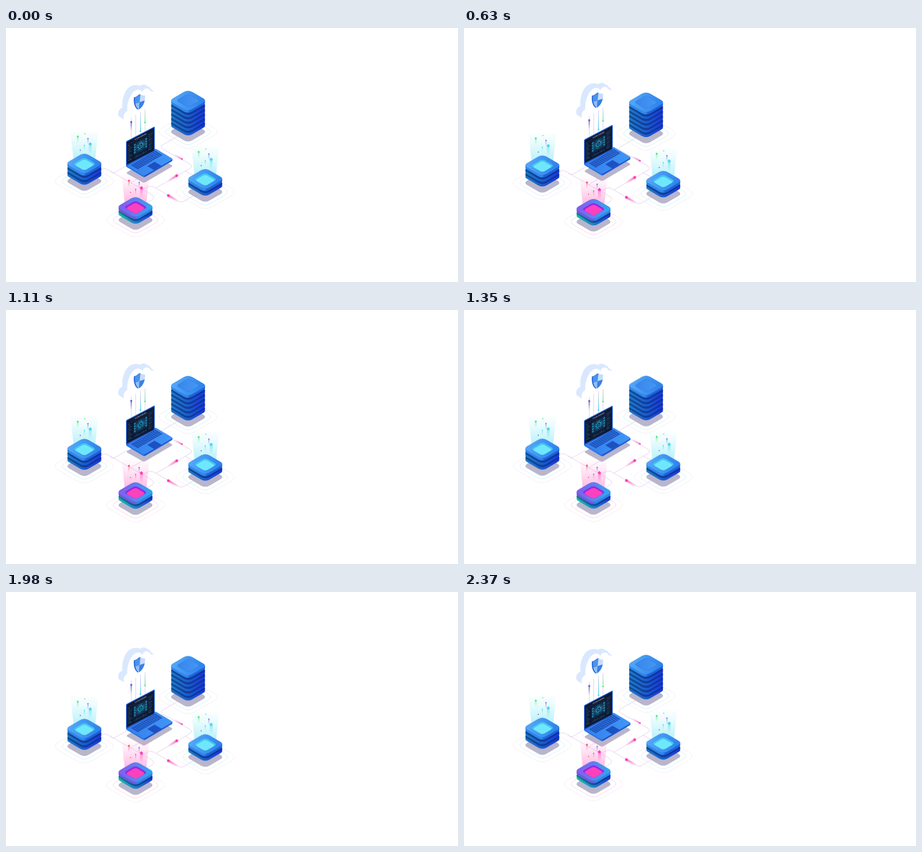
Animation of 998x561 px, one loop 2400 ms. Source, as an HTML page:

```html
<!DOCTYPE html>
<html lang="en">
<head>
<meta charset="utf-8">
<title>Isometric network</title>
<style>
html, body { margin: 0; width: 100%; height: 100%; overflow: hidden; background: #fff; }
svg { display: block; width: 998px; height: 561px; }
</style>
</head>
<body>
<svg id="stage" viewBox="0 0 998 561" xmlns="http://www.w3.org/2000/svg">
  <defs id="defs"></defs>
  <g id="ground"></g>
  <g id="device"></g>
  <g id="racks"></g>
</svg>
<script>
const NS = 'http://www.w3.org/2000/svg';
const byId = id => document.getElementById(id);
const defs = byId('defs'), ground = byId('ground'), device = byId('device'), racks = byId('racks');

function add(parent, tag, attrs) {
  const el = document.createElementNS(NS, tag);
  for (const k in attrs) el.setAttribute(k, attrs[k]);
  return parent.appendChild(el);
}
const shape = (g, d, fill, more) => add(g, 'path', { d, fill, ...more });
const stroke = (g, d, color, width = 0.7, more) =>
  add(g, 'path', { d, fill: 'none', stroke: color, 'stroke-width': width, ...more });

// Gradient in stage coordinates; each stop is [offset, colour, opacity]
let gradCount = 0;
function grad(x1, y1, x2, y2, stops) {
  const id = 'g' + gradCount++;
  const lg = add(defs, 'linearGradient', { id, x1, y1, x2, y2, gradientUnits: 'userSpaceOnUse' });
  for (const [offset, color, alpha = 1] of stops)
    add(lg, 'stop', { offset, 'stop-color': color, 'stop-opacity': alpha });
  return `url(#${id})`;
}

// Fading streak from a head point to a far end
function tail(g, x1, y1, x2, y2, w, color, alpha = 0.55) {
  const len = Math.hypot(x2 - x1, y2 - y1);
  const nx = -(y2 - y1) / len * w / 2, ny = (x2 - x1) / len * w / 2;
  shape(g, `M${x1 + nx} ${y1 + ny}L${x2 + nx} ${y2 + ny}L${x2 - nx} ${y2 - ny}L${x1 - nx} ${y1 - ny}Z`,
    grad(x1, y1, x2, y2, [[0, color, alpha], [1, color, 0]]));
}
const gem = (g, x, y, r, color) => shape(g, `M${x} ${y - r}l${r} ${r}l${-r} ${r}l${-r} ${-r}z`, color);

// Isometric rounded square
const CUT = 0.22, RATIO = 0.577;
function diamond(x, y, a) {
  const b = a * RATIO, c = CUT, d = 1 - CUT;
  return `M${x - a * d} ${y - b * c}L${x - a * c} ${y - b * d}Q${x} ${y - b} ${x + a * c} ${y - b * d}` +
    `L${x + a * d} ${y - b * c}Q${x + a} ${y} ${x + a * d} ${y + b * c}` +
    `L${x + a * c} ${y + b * d}Q${x} ${y + b} ${x - a * c} ${y + b * d}` +
    `L${x - a * d} ${y + b * c}Q${x - a} ${y} ${x - a * d} ${y - b * c}Z`;
}
// Front wall below the same rounded square
function wall(x, y, a, h) {
  const b = a * RATIO, c = CUT, d = 1 - CUT, e = a * (1 - CUT / 2), z = y + h;
  return `M${x - e} ${y}V${z}Q${x - e} ${z + b * c / 2} ${x - a * d} ${z + b * c}` +
    `L${x - a * c} ${z + b * d}Q${x} ${z + b} ${x + a * c} ${z + b * d}` +
    `L${x + a * d} ${z + b * c}Q${x + e} ${z + b * c / 2} ${x + e} ${z}V${y}Z`;
}

const SIZE = 42, THICK = 5.5, STEP = 10, SHADOW = '#b9b5cb';

// Colours run from the left corner to the right one
const BLUE = {
  face: ['#52a5f7', '#2f84ec'], top: ['#2f86ea', '#1c62d8'],
  side: ['#1f78cc', '#1a5fca', '#1539dc'], shade: ['#104a8e', '#1230a6']
};
const PINK = {
  face: ['#8260ee', '#35a3f0'], top: ['#6f58e2', '#2b86e6'],
  side: ['#16bcb0', '#1f84c6', '#1539dc'], shade: ['#0f7f86', '#1230a6']
};

function rack(x, y, plates, skin, ring, beam) {
  const topY = y - 19 - STEP * (plates - 1);
  stroke(ground, diamond(x, y, 72), '#ecdff3', 0.7);
  stroke(ground, diamond(x, y, 55.5), ring, 0.9);
  shape(racks, diamond(x, y, SIZE), SHADOW);
  if (beam) shape(racks, `M${x - 31} ${topY - 74}H${x + 31}L${x + 23} ${topY}H${x - 23}Z`,
    grad(0, topY - 74, 0, topY, [[0, beam, 0], [0.35, beam, 0.2], [1, beam, 0.7]]));
  for (let i = 0; i < plates; i++) {
    const py = y - 19 - STEP * i, last = i === plates - 1;
    const [l, r] = skin.top, [s0, s1, s2] = skin.side;
    const side = last ? [[0, l], [0.48, l], [0.56, r], [1, r]] : [[0, s0], [0.48, s1], [1, s2]];
    shape(racks, wall(x, py, SIZE, THICK), grad(x - 37, 0, x + 37, 0, side));
    const [f0, f1] = last ? skin.face : skin.shade;
    shape(racks, diamond(x, py, SIZE), grad(x - 30, py - 6, x + 30, py + 8, [[0, f0], [1, f1]]));
  }
  return topY;
}

function pad(x, y, rim, core) {
  shape(racks, diamond(x, y + 1, 26), rim);
  shape(racks, diamond(x, y + 3, 22), core);
}

// Sparks: dx, dy, radius, tail length, colour
const GREEN = '#4be77c', VIOLET = '#5b55d6', CYAN = '#4fd5ee', ROSE = '#ff3db4', RED = '#f4536f';
const coolSparks = [
  [-14.5, -59.5, 2.5, 14, GREEN], [1, -65.5, 1.5, 0, GREEN], [8, -55, 1.6, 13, VIOLET],
  [13, -43, 4, 22, CYAN], [0, -40, 1.5, 12, CYAN], [-9, -29, 1.4, 0, VIOLET]
];
const warmSparks = [
  [-14.5, -58, 2.5, 14, RED], [8, -54, 1.6, 12, VIOLET], [13, -42, 4, 22, ROSE],
  [0.3, -39, 1.6, 12, ROSE], [-11, -32, 1.5, 0, RED]
];
function sparks(x, y, list) {
  for (const [dx, dy, r, len, color] of list) {
    if (len) tail(racks, x + dx, y + dy, x + dx, y + dy + len, r * 1.6, color, 0.5);
    gem(racks, x + dx, y + dy, r, color);
  }
}

// Wiring
[
  'M208 315L213 312Q218 309 225 313L320 367Q331 374 322 380L306 389',
  'M230 316Q236 322 242 318L268 303',
  'M302 326L281 338Q276 341 277.500 344',
  'M395 230L346 258Q339 262 346 267L405 300Q414 305 407 309.500L332 353',
  'M396 316L416 327',
  'M300 357L315 350Q321 347.500 328 352L380 382Q387 386 394 382L440 355'
].forEach(d => stroke(ground, d, '#d3b4e6', 0.75));

// Travelling packets: head, tail end, size
[
  [388.5, 289.3, 371, 279, 3.2],
  [377, 326, 357, 338.5, 5.4],
  [358.5, 370, 381, 383, 5.4]
].forEach(([x, y, tx, ty, s]) => {
  tail(ground, x, y, tx, ty, s, ROSE, 0.65);
  add(ground, 'rect', { x: x - s / 2, y: y - s / 2, width: s, height: s, fill: ROSE, transform: `rotate(18 ${x} ${y})` });
});

// Racks
const TEAL = '#c4eef3';
const towerY = rack(402, 229, 6, BLUE, TEAL);
const inset = diamond(402, towerY, 26);
shape(racks, inset, grad(380, 0, 424, 0, [[0, '#3787ec'], [1, '#4596f3']]));
stroke(racks, inset, '#3277dc', 0.6);

[[173, 338, 3], [440, 362, 2]].forEach(([x, y, n]) => {
  const top = rack(x, y, n, BLUE, TEAL, '#8beaf6');
  pad(x, top, '#43c3ef', '#6ee7fb');
  sparks(x, top, coolSparks);
});
const pinkY = rack(286, 424, 2, PINK, '#fbc3e4', '#ff8ed2');
pad(286, pinkY, '#9a25e2', '#fb41bd');
sparks(286, pinkY, warmSparks);

// Cloud and shield
shape(device, 'M260 202L249 195C245 186 251 178 257 176C255 160 262 135 275 129C283 125 291 125 295 128' +
  'C302 124 308 124 313 129C316 129.500 318 131 319 134L327 140.500L330 160L300 200Z', '#d9e8fe');
shape(device, 'M261 204C257 192 263 186 268 183C266 167 274 146 284 139C291 134 298 136 301 142' +
  'C304 132 314 131 319 139C322 141.500 325 140 328 141L334 165L310 204Z', '#fff');

const shield = 'M285 153C290 152 294 149 297 146C300 149 304 150 307 149C308 162 303 174 293.500 180C287 176 283.500 166 285 153Z';
shape(device, shield, '#2467d6', { transform: 'translate(-2.500 .4)' });
add(add(defs, 'clipPath', { id: 'shield' }), 'path', { d: shield });
const quarters = add(device, 'g', { 'clip-path': 'url(#shield)' });
shape(quarters, 'M280 145H297L295 164L280 169Z', '#4a93ee');
shape(quarters, 'M297 145H310V159L295 164Z', '#c6dcfc');
shape(quarters, 'M280 169L295 164L293.500 182H280Z', '#8fbdf8');
shape(quarters, 'M295 164L310 159V182H293.500Z', '#3a80e4');

// Uplink lines
[[276.5, 198, 244], [286.5, 192, 240], [297, 185, 236], [307, 180, 230]]
  .forEach(([x, y1, y2]) => stroke(device, `M${x} ${y1}V${y2}`, '#d3b4e6', 0.8));
tail(device, 276.5, 207.5, 276.5, 228, 3.4, VIOLET, 0.7);
gem(device, 276.5, 207.5, 2.6, VIOLET);
tail(device, 297, 228, 297, 186, 2, CYAN, 0.85);
gem(device, 297, 228, 2.3, CYAN);
tail(device, 307, 209, 307, 181, 1.8, GREEN, 0.7);
gem(device, 307, 209, 2.2, GREEN);

// Laptop
shape(device, 'M268 318L327 283.500Q330 282 333 283.500L365 302.500Q369 305 365 307L308 340.500Q305 342.500 302 341L268 322Q265 320 268 318Z', SHADOW);
shape(device, 'M265.500 302V305.500Q266 307 268 308L302 328.500Q305 330.500 308 328.500L366 294.500Q367.500 293.500 367.500 291.500V289Z',
  grad(266, 0, 367, 0, [[0, '#2873e4'], [0.38, '#2873e4'], [0.4, '#1e54cb'], [1, '#2060d6']]));
shape(device, 'M267 302L327 268Q330 266 333 268L365 287Q369 289.500 365 291.500L308 324.500Q305 326.500 302 325L268 305Z',
  grad(275, 0, 360, 0, [[0, '#3582ee'], [1, '#4094f5']]));

const ROWS = 5, KEYS = 13;
let keys = '';
for (let r = 0; r < ROWS; r++)
  for (let k = 0; k < KEYS; k++) {
    const x = 276 + 55 * k / KEYS + 3.1 * r, y = 303 - 32 * k / KEYS + 1.9 * r;
    keys += `M${x.toFixed(2)} ${y.toFixed(2)}l3.5 -2l2.5 1.5l-3.5 2z`;
  }
shape(device, keys, '#1a49b2');
shape(device, 'M312 305L328 295.500L343.500 304.500L327 314Z', '#1c51c2');

const lid = add(device, 'g', { transform: 'matrix(1 -.52 0 1 268 252)' });
const box = (x, y, width, height, fill, rx = 0) => add(lid, 'rect', { x, y, width, height, fill, rx });
box(-3, -3.2, 63.5, 55.2, '#1d5bd6', 2.5);
box(-2, -2.4, 61.8, 53, '#2468de', 2);
box(-1.2, -1.2, 60, 50.6, '#0d1a34', 0.8);
box(1, 6, 56, 0.5, '#6b3a55');
const title = add(lid, 'text', {
  x: 29, y: 4.2, fill: '#dce9f5', 'font-size': 2.8, 'font-weight': 700,
  'text-anchor': 'middle', 'font-family': 'Roboto, Arial, sans-serif'
});
title.textContent = 'SYSTEM OVERVIEW';
box(14, 10, 30, 27, '#10294a', 1);
[[10.5, 1], [8, 1.2], [5.2, 1.6]].forEach(([r, w], i) => add(lid, 'circle', {
  cx: 29, cy: 23, r, fill: 'none', stroke: ['#175677', '#2790b0', '#2fb4cf'][i],
  'stroke-width': w, 'stroke-dasharray': i === 1 ? '9 2' : 'none'
}));
add(lid, 'circle', { cx: 29, cy: 23, r: 2.4, fill: '#1c6f94' });
for (let i = 0; i < 4; i++) {
  box(14.5, 13 + i * 5.5, 4, 3.8, '#237f9f');
  box(39.5, 13 + i * 5.5, 4, 3.8, '#237f9f');
}
for (let i = 0; i < 10; i++) {
  const y = 9 + i * 3.6, w = 3 + (i * 7 % 5) * 1.4, color = i % 3 ? '#40566f' : '#2a86a5';
  box(2, y, w, 0.9, color);
  box(46.5, y, 11 - w * 0.6, 0.9, color);
  box(15 + i * 2.8, 44 - w * 0.5, 1.4, w * 0.5, '#31506f');
}

// The laptop group rises while everything else sinks, then back
const drift = (el, dy) => el.animate(
  [{ transform: 'translateY(0px)' }, { transform: `translateY(${dy}px)` }],
  { duration: 1200, iterations: Infinity, direction: 'alternate', easing: 'linear' });
drift(ground, 7.5);
drift(racks, 7.5);
drift(device, -7.5);
</script>
</body>
</html>
```
